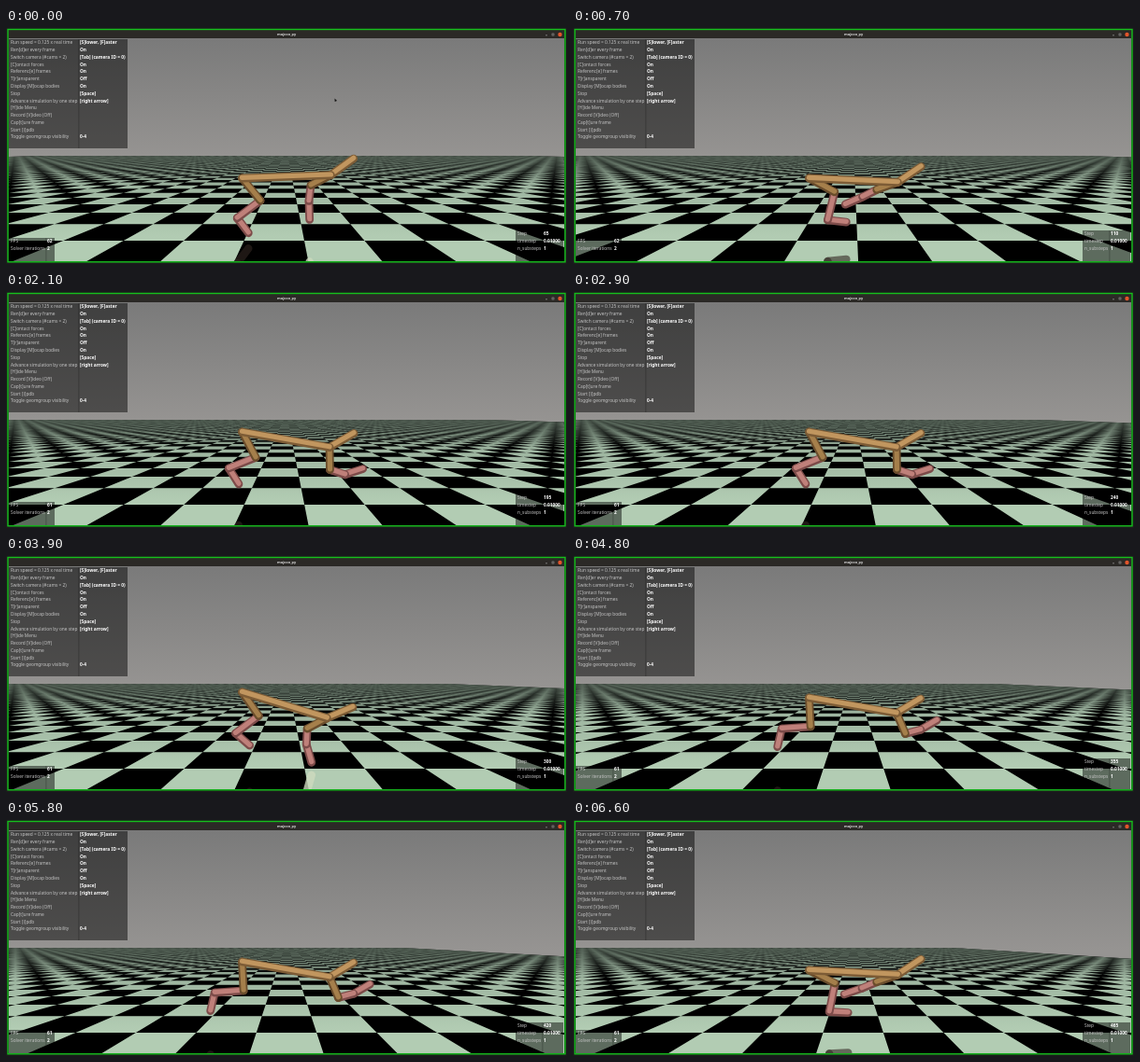
These frames come from a looping animation (600x253 px, 6.7 s). An HTML page with a canvas:

```html
<!DOCTYPE html>
<html lang="en">
<head>
<meta charset="utf-8">
<title>mujoco_py</title>
<style>
html, body { margin: 0; width: 100%; height: 100%; overflow: hidden; background: #1c1c1c; }
canvas { display: block; }
</style>
</head>
<body>
<canvas id="stage" width="600" height="253"></canvas>
<script>
const ctx = document.getElementById('stage').getContext('2d');
const FONT = '"Noto Sans", "Open Sans", sans-serif';
const HORIZON = 130.5, GROUND = 228, FOCAL = 290, TILE = 2 / 3, HALF = 40, BODY_DEPTH = 3;

// Rump height, then angles in degrees (0 right, 90 down):
// torso, head, hind thigh, shin, foot, front thigh, shin, foot.
const POSES = {
  push:   [161, -2, -36, 51, 143, 53, 153, 97, 88],
  extend: [152, 10, -31, 87, 176, 103, 67, -15, -30],
  reach:  [150, 10, -30, 62, 158, 58, 89, 18, -18],
  land:   [146, 17, -23, 55, 143, 41, 152, 93, 74],
  gather: [161, 3, -34, 27, 101, 3, 161, 157, 161]
};
const STRIDE = Object.values(POSES);

// tick, poses passed, metres run
const TRACK = [
  [0, 0, 0.47], [13, 17, 4.47], [29, 37, 9.8], [39, 48, 13.8],
  [48, 61, 17], [58, 76, 21], [66, 84, 23.67]
];

const MENU = [
  ['Run speed = 0.125 x real time', '[S]lower, [F]aster'],
  ['Ren[d]er every frame', 'On'],
  ['Switch camera (#cams = 2)', '[Tab] (camera ID = 0)'],
  ['[C]ontact forces', 'On'],
  ['Referenc[e] frames', 'On'],
  ['T[r]ansparent', 'Off'],
  ['Display [M]ocap bodies', 'On'],
  ['Stop', '[Space]'],
  ['Advance simulation by one step', '[right arrow]'],
  ['[H]ide Menu', ''],
  ['Record [V]ideo (Off)', ''],
  ['Cap[t]ure frame', ''],
  ['Start [i]pdb', ''],
  ['Toggle geomgroup visibility', '0-4']
];

const TAN = ['#7d5c36', '#c1965f'], BROWN = ['#6a4d2c', '#a57f4b'], PINK = ['#7c4b49', '#bf807a'];

const mix = (a, b, u) => a.map((v, i) => v + (b[i] - v) * u);

function track(tick) {
  const i = TRACK.findIndex(key => key[0] >= tick) || 1;
  const [a, b] = [TRACK[i - 1], TRACK[i]];
  return mix(a, b, (tick - a[0]) / (b[0] - a[0]));
}

function poseAt(phase) {
  const i = Math.floor(phase + 1e-6), u = phase - i, n = STRIDE.length;
  return mix(STRIDE[i % n], STRIDE[(i + 1) % n], u * u * (3 - 2 * u));
}

function reach([x, y], degrees, length) {
  const a = degrees * Math.PI / 180;
  return [x + length * Math.cos(a), y + length * Math.sin(a)];
}

function box(color, x, y, w, h) {
  ctx.fillStyle = color;
  ctx.fillRect(x, y, w, h);
}

function fade(y0, y1, from, to) {
  const g = ctx.createLinearGradient(0, y0, 0, y1);
  g.addColorStop(0, from);
  g.addColorStop(1, to);
  return g;
}

function text(str, x, y, color, weight, size) {
  ctx.font = `${weight} ${size}px ${FONT}`;
  ctx.fillStyle = color;
  ctx.fillText(str, x, y);
}

function quad(project, x0, x1, z0, z1) {
  ctx.moveTo(...project(x0, z0));
  ctx.lineTo(...project(x1, z0));
  ctx.lineTo(...project(x1, z1));
  ctx.lineTo(...project(x0, z1));
  ctx.closePath();
}

function drawFloor(runX) {
  const rise = (GROUND - HORIZON) * BODY_DEPTH;
  const project = (x, z) => [300 + (x - runX) * FOCAL / z, HORIZON + rise / z];
  ctx.save();
  ctx.beginPath();
  quad(project, -HALF, HALF, 2, HALF + BODY_DEPTH);
  ctx.clip();
  box('#000', 0, 130, 600, 123);
  ctx.beginPath();
  for (let row = -2; row < HALF / TILE; row++) {
    const near = BODY_DEPTH + row * TILE, far = near + TILE;
    const view = 305 * far / FOCAL;
    const last = Math.min(HALF, runX + view) / TILE;
    let col = Math.floor(Math.max(-HALF, runX - view) / TILE);
    if ((col + row) % 2) col++;
    for (; col < last; col += 2) quad(project, col * TILE, (col + 1) * TILE, near, far);
  }
  ctx.fillStyle = fade(140, 225, '#93a996', '#b2ccb3');
  ctx.fill();
  box(fade(137, 168, 'rgba(76,89,78,.9)', 'rgba(60,70,62,0)'), 0, 130, 600, 38);
  ctx.restore();
}

function line(a, b, color, width, dy = 0) {
  ctx.strokeStyle = color;
  ctx.lineWidth = width;
  ctx.beginPath();
  ctx.moveTo(a[0], a[1] + dy);
  ctx.lineTo(b[0], b[1] + dy);
  ctx.stroke();
}

function limb(a, b, [edge, core]) {
  line(a, b, edge, 8.8);
  line(a, b, core, 5.2, -0.7);
}

function drawReflection(a, b, color) {
  const mirror = ([x, y]) => [x, 2 * GROUND - y];
  line(mirror(a), mirror(b), color, 8.5);
}

function drawRunner(phase) {
  const [height, torso, neck, thigh, shin, foot, frontThigh, frontShin, frontFoot] = poseAt(phase);
  const rump = [252.5, height];
  const shoulder = reach(rump, torso, 95), head = reach(shoulder, neck, 30);
  const knee = reach(rump, thigh, 31), ankle = reach(knee, shin, 31), toe = reach(ankle, foot, 20);
  const frontKnee = reach(shoulder, frontThigh, 24);
  const frontAnkle = reach(frontKnee, frontShin, 17), frontToe = reach(frontAnkle, frontFoot, 20);

  drawReflection(knee, ankle, 'rgba(50,38,34,.6)');
  drawReflection(ankle, toe, 'rgba(50,38,34,.6)');
  drawReflection(frontAnkle, frontToe, 'rgba(205,218,190,.8)');

  limb(ankle, toe, PINK);
  limb(knee, ankle, PINK);
  limb(rump, knee, BROWN);
  limb(frontAnkle, frontToe, PINK);
  limb(frontKnee, frontAnkle, PINK);
  limb(shoulder, frontKnee, BROWN);
  limb(shoulder, head, TAN);
  limb(rump, shoulder, TAN);
}

function panel(x, y, w, h, split, rows, pitch) {
  box('rgba(0,0,0,.48)', x, y, w, h);
  box('rgba(0,0,0,.3)', split - 1.5, y, 0.8, h);
  rows.forEach(([label, value], i) => {
    const ty = y + 4 + i * pitch;
    text(label, x + 2, ty, '#c4c4c4', 400, 4.8);
    text(value, split, ty, '#fff', 600, 4.8);
  });
}

function drawWindow() {
  box('#2b2926', 2, 2, 596, 9);
  ctx.textAlign = 'center';
  text('mujoco_py', 300, 6.9, '#ddd', 700, 3.8);
  ctx.textAlign = 'left';
  box('#999', 577, 7.5, 2, 0.7);
  ctx.strokeStyle = '#999';
  ctx.lineWidth = 0.6;
  ctx.strokeRect(584, 6, 2, 2);
  ctx.fillStyle = '#e2552b';
  ctx.beginPath();
  ctx.arc(592.5, 7, 2.2, 0, 7);
  ctx.fill();
  ctx.strokeStyle = '#14c01c';
  ctx.lineWidth = 1.4;
  ctx.strokeRect(2, 1.5, 596, 249.3);
}

function drawCursor() {
  ctx.fillStyle = '#111';
  ctx.beginPath();
  ctx.moveTo(351.5, 75.5);
  ctx.lineTo(354, 78);
  ctx.lineTo(351.7, 79);
  ctx.fill();
}

function draw(now) {
  const tick = Math.floor(now % 6700 / 100);
  const [, phase, runX] = track(tick);
  const step = 5 * Math.round((65 + 6.085 * tick) / 5);
  const fps = tick < 8 ? 62 : tick < 20 ? 60 : 61;

  ctx.lineCap = 'round';
  ctx.textBaseline = 'middle';
  box('#1c1c1c', 0, 0, 600, 253);
  ctx.save();
  ctx.beginPath();
  ctx.rect(3, 11, 594, 239);
  ctx.clip();
  box(fade(11, 140, '#7a7a7a', '#969492'), 0, 11, 600, 242);
  drawFloor(runX);
  drawRunner(phase);
  panel(3, 12, 127, 117, 79, MENU, 7.77);
  panel(3, 225, 49, 25, 44, [['FPS', fps], ['Solver iterations', 2]], 8);
  panel(545, 217, 51, 33, 575,
    [['Step', step], ['timestep', '0.01000'], ['n_substeps', 1]], 8);
  if (tick < 3) drawCursor();
  ctx.restore();
  drawWindow();
}

const start = performance.now();
function loop() {
  draw(performance.now() - start);
  requestAnimationFrame(loop);
}
loop();
</script>
</body>
</html>
```
